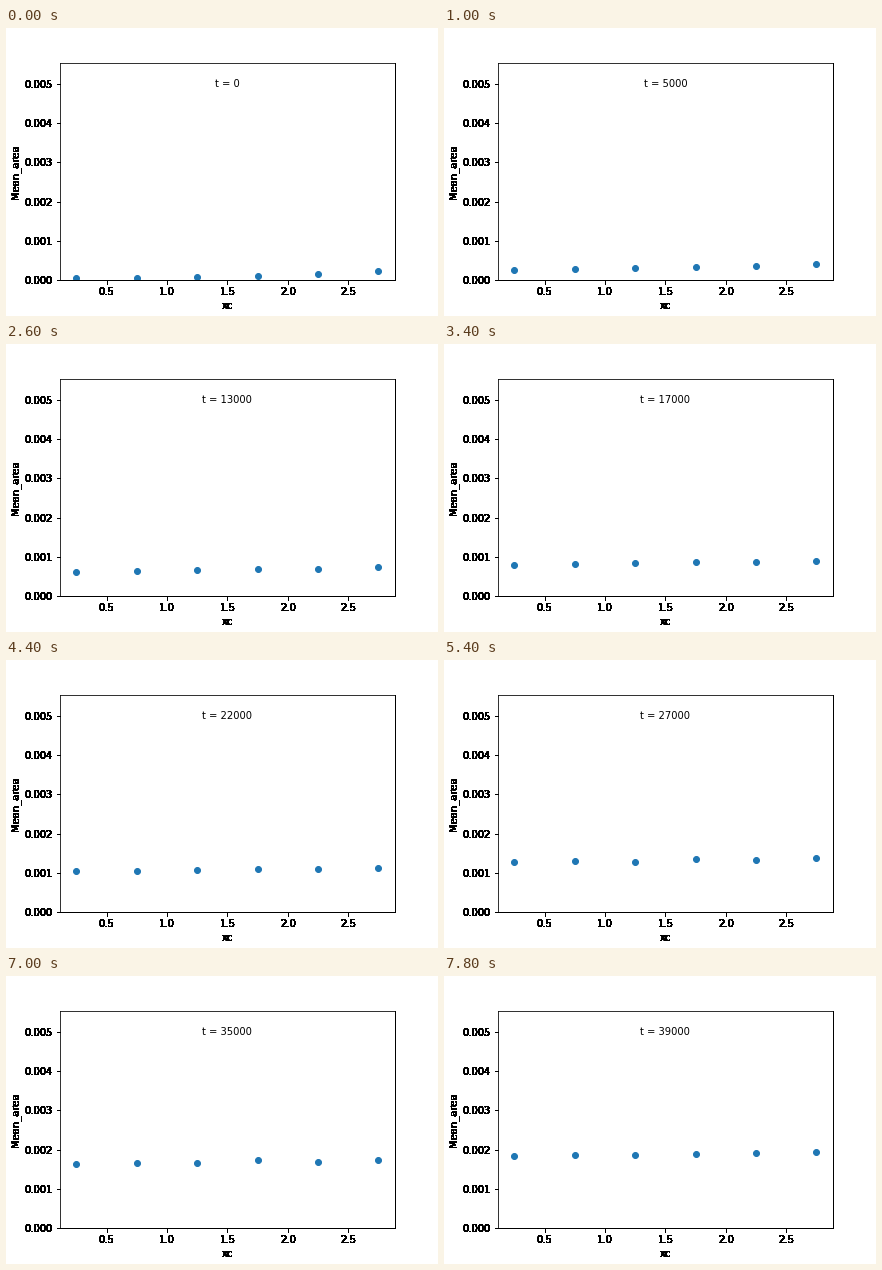
A matplotlib script for the animation above (8 s loop, 432 by 288 pixels).

```python
import numpy as np
import matplotlib.pyplot as plt
from matplotlib.animation import FuncAnimation

FRAMES = 40
STEP = 1000
OVERDRAW = 100

index = np.arange(6)
xc = 0.25 + 0.5 * index
u = index / 5


def areas(k):
    growth = 4 + 4.4 * k + 0.005 * k**2
    lean = 9 * u + 9 * u**4 * np.exp(-k / 8)
    # A short-lived ripple around the fourth point
    d = index - 3
    ripple = 7 * np.cos(np.pi * d) * np.exp(-(d / 1.5)**2 - ((k - 31) / 5)**2)
    return (growth + lean + ripple) * 1e-5


def solidify(image, dpi):
    """Build up opacity as if the artist were drawn many times over."""
    image = image.copy()
    image[..., 3] = 1 - (1 - image[..., 3])**OVERDRAW
    return image, 0, 0


plt.rcParams["font.family"] = "DejaVu Sans"
fig = plt.figure(figsize=(6, 4), dpi=72, facecolor="white")
ax = fig.add_axes([0.125, 0.125, 0.775, 0.755])
ax.set_xlim(1.5 - 1.386, 1.5 + 1.386)
ax.set_ylim(0, 0.00554)
ax.set_xticks(np.arange(0.5, 2.6, 0.5))
ax.set_yticks(np.arange(6) * 0.001, [f"{i / 1000:.3f}" for i in range(6)])
ax.set_xlabel("xc")
ax.set_ylabel("Mean_area")

for part in (ax.xaxis, ax.yaxis, ax.spines["right"], ax.spines["bottom"]):
    part.set_agg_filter(solidify)

dots = ax.scatter(xc, areas(0), s=36, color="#1f77b4")
clock = ax.text(1.5, 0.005, "t = 0", ha="center", va="center")


def update(k):
    dots.set_offsets(np.column_stack([xc, areas(k)]))
    clock.set_text(f"t = {k * STEP}")
    return dots, clock


anim = FuncAnimation(fig, update, frames=FRAMES, interval=200,
                     repeat=True, repeat_delay=0, blit=False)
plt.show()
```
